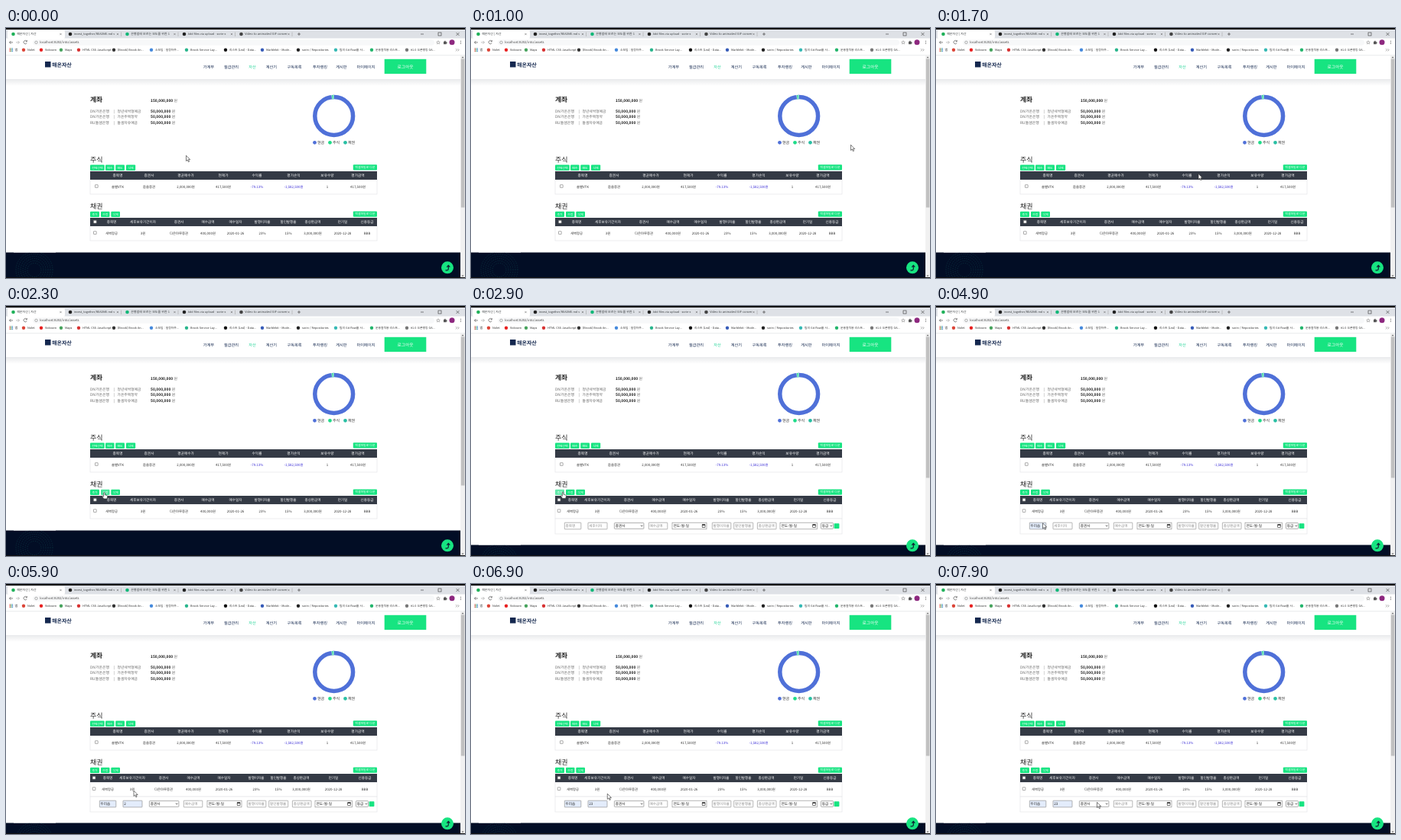
Write an HTML page that moves like this. It is 600 px wide and 328 px high and loops after 8 s.

```html
<!DOCTYPE html>
<html lang="ko">
<head>
<meta charset="utf-8">
<title>자산</title>
<style>
html, body { margin: 0; width: 100%; height: 100%; overflow: hidden; background: #fff; }
svg { display: block; width: 600px; height: 328px; }
text { font-family: "Noto Sans CJK KR", "Noto Sans CJK", "Noto Sans", sans-serif; white-space: pre; text-rendering: geometricPrecision; }
</style>
</head>
<body>
<svg id="stage" viewBox="0 0 600 328" xmlns="http://www.w3.org/2000/svg">
  <defs>
    <linearGradient id="shade" x2="0" y2="1">
      <stop stop-color="#e9eaec"/><stop offset="1" stop-color="#fff"/>
    </linearGradient>
    <clipPath id="view"><rect y="36" width="594" height="291"/></clipPath>
  </defs>
</svg>
<script>
const NS = 'http://www.w3.org/2000/svg';
const LOOP = 8000, STEP = 100;
const GREEN = '#17e481', DARK = '#343a45', INK = '#333', BLUE = '#3c2fd6', NAVY = '#14284f';
const stage = document.getElementById('stage');

function add(parent, tag, attrs, content) {
  const el = document.createElementNS(NS, tag);
  for (const key in attrs) el.setAttribute(key, attrs[key]);
  if (content !== undefined) el.textContent = content;
  parent.append(el);
  return el;
}
const group = (parent, attrs = {}) => add(parent, 'g', attrs);
const rect = (p, x, y, width, height, fill, more) => add(p, 'rect', { x, y, width, height, fill, ...more });
const dot = (p, cx, cy, r, fill) => add(p, 'circle', { cx, cy, r, fill });
const path = (p, d, stroke, width = 0.7, fill = 'none') => add(p, 'path', { d, stroke, 'stroke-width': width, fill });

// y is the middle of the line
function label(p, x, y, text, size = 4.5, fill = INK, more = {}) {
  return add(p, 'text', { x, y: y + size * 0.36, 'font-size': size, fill, ...more }, text);
}
const centred = (p, x, y, text, size, fill, weight = 400) =>
  label(p, x, y, text, size, fill, { 'text-anchor': 'middle', 'font-weight': weight });

function button(p, x, y, width, text) {
  const box = rect(p, x, y, width, 7.4, GREEN, { rx: 1 });
  centred(p, x + width / 2, y + 3.6, text, 3.9, '#fff');
  return box;
}
function checkbox(p, x, y) {
  rect(p, x - 1.8, y - 1.8, 3.7, 3.7, '#fff', { stroke: '#777', 'stroke-width': 0.6, rx: 0.3 });
}
function cells(p, xs, y, texts, size, fill, weight) {
  texts.forEach((text, i) => centred(p, xs[i], y, text, size, typeof fill === 'function' ? fill(i) : fill, weight));
}
function rowFrame(p, y, height) {
  rect(p, 110, y, 375, height, '#fff', { stroke: '#e4e5e8', 'stroke-width': 0.7 });
}

// Draws the browser window and returns its scrollbar thumb
function drawBrowser() {
  const b = group(stage);
  rect(b, 0, 0, 600, 36, '#fff');
  rect(b, 0, 0, 600, 13.5, '#dee1e6');
  rect(b, 0, 0, 600, 2, '#111');
  rect(b, 2, 3, 75, 11, '#fff', { rx: 2 });
  const tabs = [
    ['해온자산 | 자산', '#20b15a'], ['invest_together/README.md v', '#222'],
    ['은행앱에 모르는 보도를 위한 1', '#12b878'], ['Add files via upload · sorin-x', '#222'],
    ['Video to animated GIF conver', '#444']
  ];
  tabs.forEach(([title, color], i) => {
    const x = 9.5 + i * 74.5;
    dot(b, x, 8, 2.3, color);
    label(b, x + 4.7, 8, title, i % 2 ? 3.75 : 4, '#3c4043');
    path(b, `M${x + 60.8} 6.9l2.3 2.3m0-2.3l-2.3 2.3`, '#555', 0.5);
    if (i) path(b, `M${x + 66.5} 5.5v5.5`, '#999', 0.5);
  });
  path(b, 'M381 8h4m-2-2v4M542 8h4M588.5 6l4 4m0-4l-4 4', '#333', 0.6);
  rect(b, 565, 6, 4, 4, 'none', { stroke: '#333', 'stroke-width': 0.6 });

  rect(b, 35, 15.2, 525, 7.6, '#f7f8f9', { rx: 3.8 });
  path(b, 'M9 18.9H4.5m2-2l-2 2l2 2', '#555');
  path(b, 'M13 18.9h4.5m-2-2l2 2l-2 2', '#aaa');
  path(b, 'M27 17.3a2.2 2.2 0 1 0 .2 2.4m.2-3.7v1.8h-1.8', '#555');
  add(b, 'circle', { cx: 39.5, cy: 18.9, r: 1.7, fill: 'none', stroke: '#666', 'stroke-width': 0.5 });
  label(b, 44, 18.9, 'localhost:8202/into/assets', 4.2, '#444');
  path(b, 'M565 16.7l.7 1.5 1.6.1-1.2 1.1.4 1.6-1.5-.9-1.5.9.4-1.6-1.2-1.1 1.6-.1z', '#555', 0.4);
  path(b, 'M572 17.7h1.3v-1h1.2v1h1.3v1.2h.8v1.2h-.8v1.2H572z', 'none', 0, '#555');
  dot(b, 583, 18.8, 3.5, '#8d287f');
  for (const y of [17, 18.8, 20.6]) dot(b, 594.5, y, 0.5, '#555');

  for (let i = 0; i < 9; i++) {
    rect(b, 4.5 + i % 3 * 1.7, 26.4 + Math.floor(i / 3) * 1.7, 1.2, 1.2, ['#db4a39', '#3a9d5d', '#4285d4'][i % 3]);
  }
  label(b, 11.5, 28.8, '앱', 4.1);
  const marks = [
    [23, 'Nolet', '#dc4436'], [46, 'Vidoram', '#e82020'], [72, 'Maps', '#47a35d'],
    [95, 'HTML CSS JavaScript', '#d73131'], [141, '(Brook) Brook An...', '#333'],
    [190, '소모임 : 일정자주...', '#4589dc'], [236, 'Brook Service Lay...', '#28b58c'],
    [287, '리스트 (List) - Data...', '#111'], [335, 'Marblekit - Mode...', '#365bb8'],
    [382, 'sorin / Repositories', '#222'], [431, '팀의 Git flow를 사...', '#35b9b4'],
    [478, '운용질적용 리스트...', '#22b56b'], [524, '#1.0 오픈뱅킹 OA...', '#777']
  ];
  marks.forEach(([x, text, color]) => {
    dot(b, x, 28.8, 2.2, color);
    label(b, x + 5, 28.8, text, 3.8);
  });
  path(b, 'M588 27.2l1.6 1.6l-1.6 1.6m2.5-3.2l1.6 1.6l-1.6 1.6', '#555', 0.5);
  path(b, 'M0 35.8H600', '#d9dbde', 0.6);
  rect(b, 594, 36, 6, 292, '#f1f1f1');
  path(b, 'M595.5 39.3h3l-1.5-1.8zM595.5 324.5h3l-1.5 1.8z', 'none', 0, '#666');
  return rect(b, 594.8, 40.5, 4.6, 195, '#c1c1c1');
}

function drawHeader(p) {
  rect(p, 0, 67, 594, 9, 'url(#shade)');
  rect(p, 51, 44, 7.5, 7.5, NAVY);
  label(p, 60, 48.2, '해온자산', 7, NAVY, { 'font-weight': 700 });
  cells(p, [265, 294.5, 322, 347, 377, 410.5, 438.5, 470.5], 51,
    ['가계부', '월급관리', '자산', '계산기', '구독목록', '투자랭킹', '게시판', '마이페이지'],
    5.2, i => i === 2 ? '#20d497' : NAVY);
  rect(p, 494.7, 40.8, 54.6, 19.3, GREEN);
  centred(p, 522, 50.6, '로그아웃', 5.7, '#fff', 500);
}

function drawAccounts(p) {
  label(p, 110, 94, '계좌', 8.8, '#222', { 'font-weight': 700 });
  const sum = label(p, 189, 95.5, '150,000,000', 4.9, '#111', { 'font-weight': 700 });
  add(sum, 'tspan', { 'font-weight': 400, fill: '#666' }, ' 원');
  [['DN가온은행', '청년새싹형예금'], ['DN가온은행', '가온주택청약'], ['RU들샘은행', '들샘자유예금']]
    .forEach(([bank, product], i) => {
      const y = 109 + i * 7.6;
      label(p, 110, y, bank, 4.9, '#666');
      label(p, 140.5, y, '|', 4.6, '#666');
      label(p, 145.5, y, product, 4.8, '#666');
      const amount = label(p, 189, y, '50,000,000', 4.9, '#111', { 'font-weight': 700 });
      add(amount, 'tspan', { 'font-weight': 400, fill: '#666' }, ' 원');
    });
}

function drawChart(p) {
  const ring = { cx: 428.7, cy: 115.5, r: 24.9, fill: 'none', 'stroke-width': 5.5, pathLength: 100 };
  add(p, 'circle', { ...ring, stroke: '#4f70d8' });
  const slice = (color, from, length) => add(p, 'circle', {
    ...ring, stroke: color, 'stroke-dasharray': `${length} ${100 - length}`,
    transform: `rotate(${from * 3.6 - 90} 428.7 115.5)`
  });
  slice('#fff', -1.9, 2.1);
  slice('#1fdc89', -1.6, 0.8);
  slice('#28bfa3', -0.6, 0.6);
  [['현금', '#4f70d8'], ['주식', '#1fdc89'], ['채권', '#28bfa3']].forEach(([text, color], i) => {
    dot(p, 403.5 + i * 20, 150.3, 2.4, color);
    label(p, 407 + i * 20, 150.3, text, 5);
  });
}

function drawStocks(p) {
  const xs = [146, 187, 235, 284, 328, 376, 420, 460];
  label(p, 110, 172.7, '주식', 9, '#222');
  [[110, 18.7, '전체선택'], [130, 11.5, '매수'], [143.2, 11.8, '매도'], [157, 12.2, '삭제']]
    .forEach(([x, w, text]) => button(p, x, 179.5, w, text));
  button(p, 453.8, 179.2, 31.2, '엑셀파일로 다운');
  rowFrame(p, 199, 19);
  rect(p, 110, 188, 375, 11, DARK);
  cells(p, xs, 193.4, ['종목명', '증권사', '평균매수가', '현재가', '수익률', '평가손익', '보유수량', '평가금액'], 4.7, '#fff', 500);
  checkbox(p, 118.3, 207.5);
  cells(p, xs, 208, ['솔별VTK', '돋을증권', '2,000,000원', '417,500원', '-79.13%', '-1,582,500원', '1', '417,500원'],
    4.4, i => i === 4 || i === 5 ? BLUE : INK);
}

function drawBondTable(p, xs, checkX) {
  const g = group(p);
  rowFrame(g, 260, 19);
  rect(g, 110, 249, 375, 11, DARK);
  checkbox(g, checkX, 254.2);
  cells(g, xs, 254.6, ['종목명', '세후보유기간이자', '증권사', '매수금액', '매수일자', '발행이자율', '할인발행율', '총상환금액', '만기일', '신용등급'], 4.6, '#fff', 500);
  checkbox(g, checkX, 268.6);
  cells(g, xs, 269, ['새벽항공', '3원', '다온마루증권', '400,000원', '2020-01-26', '23%', '15%', '3,000,000원', '2020-12-28', 'BBB'], 4.4, INK);
  return g;
}

// Draws a text input and returns a function that sets its value
function field(p, x, width, hint) {
  const box = rect(p, x, 284.2, width, 8.6, '#fff', { stroke: '#858585', 'stroke-width': 0.6, rx: 0.5 });
  const text = label(p, x + 1.3, 288.5, hint, 4.6, '#888');
  return value => {
    text.textContent = value || hint;
    text.setAttribute('fill', value ? '#222' : '#888');
    box.setAttribute('fill', value ? '#e3ecfb' : '#fff');
  };
}

function drawEntryRow(p) {
  rowFrame(p, 279, 20);
  const inputs = [[122.3, 21.5, '종목명'], [153, 25, '세후이자'], [232.3, 24.5, '매수금액'],
    [315.3, 24.5, '발행이자율'], [343.7, 25, '할인발행율'], [374.4, 24.6, '총상환금액']]
    .map(args => field(p, ...args));
  for (const [x, w, text] of [[187.4, 38.5, '증권사'], [457.5, 16, '등급']]) {
    rect(p, x, 284.6, w, 7.7, '#fff', { stroke: '#777', 'stroke-width': 0.6, rx: 0.7 });
    label(p, x + 1.3, 288.5, text, 4.6, '#111');
    path(p, `M${x + w - 4} 287.7l1.3 1.4l1.3-1.4`, '#222', 0.7);
  }
  for (const [x, w] of [[263, 45], [404, 48.5]]) {
    rect(p, x, 284.2, w, 8.6, '#fff', { stroke: '#858585', 'stroke-width': 0.6 });
    label(p, x + 1.5, 288.5, '연도-월-일', 4.7, '#222');
    rect(p, x + w - 5.8, 286.8, 3.8, 3.6, '#fff', { stroke: '#222', 'stroke-width': 0.6 });
    rect(p, x + w - 5.8, 286.5, 3.8, 1.3, '#222');
  }
  rect(p, 474.6, 285.2, 6.8, 6.8, GREEN, { rx: 0.8 });
  return inputs;
}

function drawFooter(p) {
  const g = group(p);
  rect(g, 0, 294.5, 594, 40, '#020d25');
  for (let r = 9; r <= 24; r += 3) {
    add(g, 'circle', { cx: 37, cy: 317.5, r, fill: 'none', stroke: '#125055', 'stroke-width': 0.7, 'stroke-dasharray': '0.8 1.9' });
  }
  // Hide the dots that rise above the footer
  rect(g, 10, 290, 55, 4.5, '#fff');
  return g;
}

const page = group(stage, { 'clip-path': 'url(#view)' });
drawHeader(page);
drawAccounts(page);
drawChart(page);
drawStocks(page);
const footer = drawFooter(page);
label(page, 110, 233.5, '채권', 9, '#222');
const [addButton, editButton] = [[110, 12, '추가'], [124, 11.5, '수정'], [137.3, 11.7, '삭제']]
  .map(([x, w, text]) => button(page, x, 240.7, w, text));
button(page, 453.8, 240.4, 31.2, '엑셀파일로 다운');
const closedTable = drawBondTable(page, [138, 179, 226, 264, 300, 335, 369, 401, 440, 472], 116.3);
const openTable = drawBondTable(page, [133, 165, 206, 245, 285, 327, 356, 386, 428, 469], 115);
const [setName, setInterest] = drawEntryRow(openTable);

dot(page, 577, 314.3, 8, GREEN);
path(page, 'M574.5 317.8h2.2q1.6 0 1.6-1.8v-4.6m-2 2.2l2-2.3l2 2.3', '#101c30', 1.2);
const thumb = drawBrowser();
rect(stage, 0, 327, 600, 1, '#111');

const arrow = path(stage, 'M0 0V7.2L1.7 5.7L2.9 8.4L4.1 7.9L2.9 5.3H5.2Z', '#222', 0.6, '#fff');
const hand = path(stage, 'M-.8 .6Q0-.5 .8 .6V3.2L3.6 4Q4.4 4.4 4.2 5.4L3.6 8.4H-.6L-2.7 5.4Q-2.8 4.2-1.6 4.7L-.8 5.4Z', '#222', 0.6, '#fff');

// Pointer: time, x, y
const route = [
  [0, 235.5, 167.3], [200, 235.5, 167.3], [1000, 496.5, 153.3], [1300, 496.5, 153.3],
  [2200, 128.5, 244.5], [2400, 128.5, 244.5], [2700, 120.2, 244], [3100, 120.2, 244],
  [3800, 139.5, 284.8], [4900, 139.5, 284.8], [5400, 165, 286], [5600, 165, 286],
  [5900, 167, 271.2], [6600, 167, 271.2], [7500, 210.5, 286.3], [8000, 210.5, 286.3]
];
function pointerAt(t) {
  const i = route.findIndex(([end]) => end > t);
  const [t0, x0, y0] = route[i - 1], [t1, x1, y1] = route[i];
  const u = (t - t0) / (t1 - t0), k = u * u * (3 - 2 * u);
  return [x0 + (x1 - x0) * k, y0 + (y1 - y0) * k];
}

const show = (el, on) => el.setAttribute('visibility', on ? 'visible' : 'hidden');

function render(t) {
  const open = t >= 2800;
  show(closedTable, !open);
  show(openTable, open);
  footer.setAttribute('transform', `translate(0 ${open ? 19 : 0})`);
  thumb.setAttribute('height', open ? 185 : 195);

  const [x, y] = pointerAt(t);
  const overButtons = y > 240 && y < 248 && x > 110 && x < 149;
  addButton.setAttribute('fill', t >= 2600 && t < 3400 ? '#62e9aa' : GREEN);
  editButton.setAttribute('fill', overButtons && x > 124 && x < 135.5 ? '#45e69a' : GREEN);
  for (const [el, on] of [[arrow, !overButtons], [hand, overButtons]]) {
    show(el, on);
    el.setAttribute('transform', `translate(${x} ${y})`);
  }
  setName(t >= 4800 ? '두리솜' : '');
  setInterest(t >= 6200 ? '23' : t >= 5800 ? '2' : '');
}

function tick() {
  render(Math.floor(performance.now() % LOOP / STEP) * STEP);
  requestAnimationFrame(tick);
}
tick();
</script>
</body>
</html>
```
